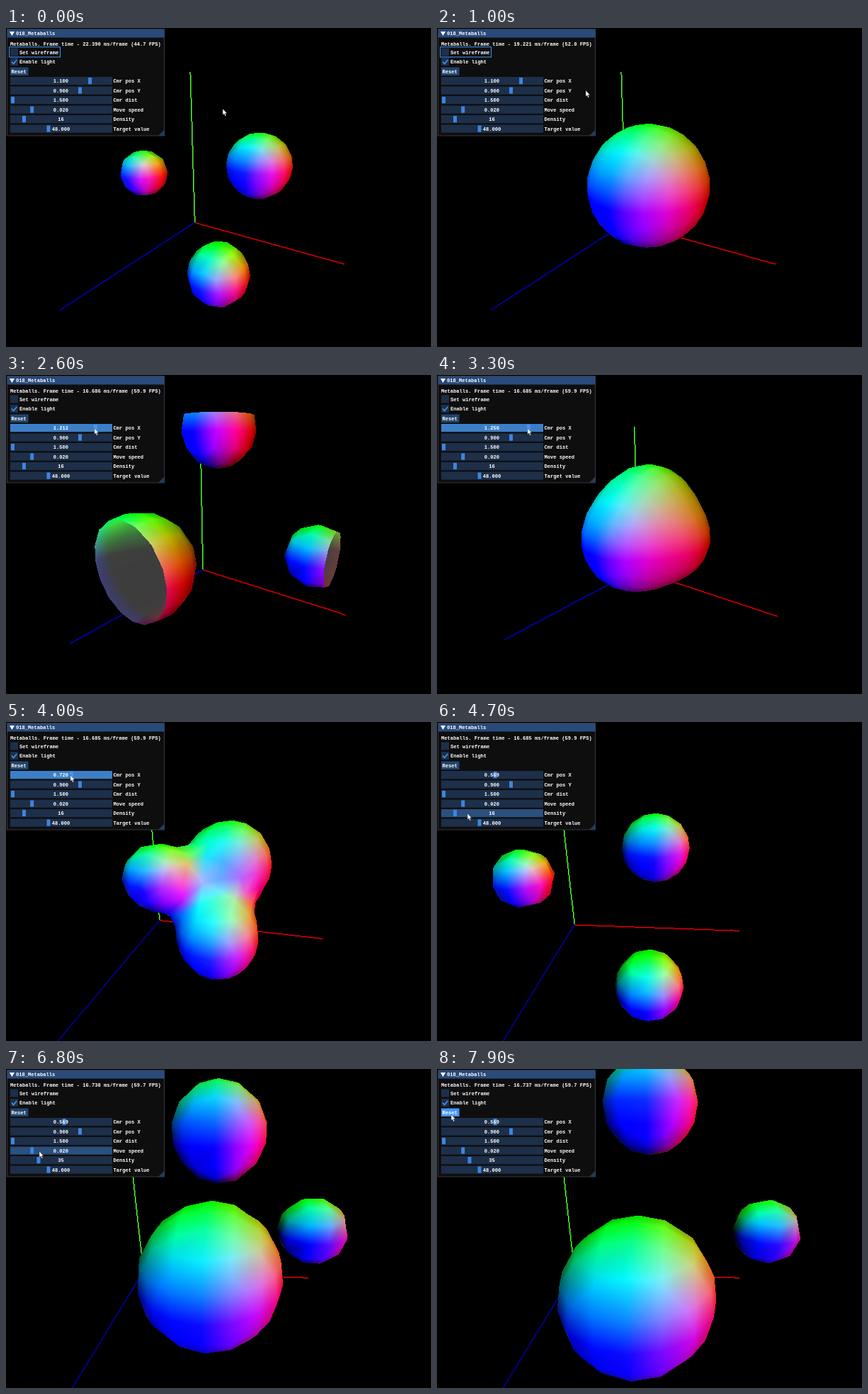
Animation, 600 px wide and 450 px high, one loop 8 s. Source, as an HTML page with a canvas:

```html
<!DOCTYPE html>
<html lang="en">
<head>
<meta charset="utf-8">
<title>Metaballs</title>
<style>
  html, body { margin: 0; width: 600px; height: 450px; overflow: hidden; background: #000; }
  canvas, svg { position: absolute; left: 0; top: 0; }
  text { font: bold 7.1px "Liberation Mono", "DejaVu Sans Mono", monospace; fill: #fff; white-space: pre; }
</style>
</head>
<body>
<canvas id="scene" width="600" height="450"></canvas>
<svg id="gui" width="600" height="450"></svg>
<script>
const W = 600, H = 450, FOCAL = 402, LOOP = 8000, CELL = 1 / 16;
const ISO = 1 / Math.sqrt(48);
const LIGHT = [0.6, 0.9, 1.6];
const ctx = document.getElementById('scene').getContext('2d');
const gui = document.getElementById('gui');
const image = ctx.createImageData(W, H);
const pixels = new Uint32Array(image.data.buffer);
const depth = new Float32Array(W * H);

// Keys are [time, value...], linear between them.
const CAM_X = [[2200, 1.1], [2500, 1.19], [2900, 1.28], [3300, 1.256], [3600, 1], [3900, 0.78], [4200, 0.6], [4350, 0.569]];
const DENSITY = [[5400, 16], [5500, 31], [6000, 29], [6400, 35]];
const FRAME_MS = [[0, 22.39], [1800, 16.686], [4700, 16.685], [6000, 16.708], [6800, 16.738], [7900, 16.737]];
const POINTER = [[0, 306, 114], [500, 300, 112], [1000, 210, 88], [1600, 117, 75], [2200, 117, 75]];
const POINTER_LATE = [[4350, 80.6, 75], [4650, 43, 129], [5400, 43, 129], [6000, 41, 129], [6400, 47, 129],
  [6550, 47, 129], [6800, 47, 116], [7100, 46, 114], [7600, 20, 64]];

function keyed(keys, t) {
  if (t <= keys[0][0]) return keys[0].slice(1);
  for (let i = 1; i < keys.length; i++) {
    const a = keys[i - 1], b = keys[i];
    if (t < b[0]) return a.slice(1).map((v, j) => v + (b[j + 1] - v) * (t - a[0]) / (b[0] - a[0]));
  }
  return keys[keys.length - 1].slice(1);
}

const dot = (a, b) => a[0] * b[0] + a[1] * b[1] + a[2] * b[2];
const sub = (a, b) => [a[0] - b[0], a[1] - b[1], a[2] - b[2]];
const unit = a => { const l = Math.hypot(...a) || 1; return a.map(v => v / l); };
const clamp = v => Math.min(1, Math.max(0, v));
const rgb = (r, g, b) => (255 << 24 | b << 16 | g << 8 | r) >>> 0;

function makeCamera(x) {
  const eye = [x, 0.9, 1.5], d = sub(eye, [0.5, 0.5, 0.5]);
  const flat = Math.hypot(d[0], d[2]), len = Math.hypot(...d);
  const ahead = d.map(v => -v / len);
  const right = [d[2] / flat, 0, -d[0] / flat];
  const up = [-d[0] * d[1] / flat / len, flat / len, -d[1] * d[2] / flat / len];
  return { eye, project(p) {
    const q = sub(p, eye), z = dot(q, ahead);
    return { x: W / 2 + FOCAL * dot(q, right) / z, y: H / 2 - FOCAL * dot(q, up) / z, w: 1 / z };
  } };
}

function triangle(a, b, c) {
  const area = (b.x - a.x) * (c.y - a.y) - (b.y - a.y) * (c.x - a.x);
  if (Math.abs(area) < 1e-6) return;
  const x0 = Math.max(0, Math.floor(Math.min(a.x, b.x, c.x))), x1 = Math.min(W - 1, Math.ceil(Math.max(a.x, b.x, c.x)));
  const y0 = Math.max(0, Math.floor(Math.min(a.y, b.y, c.y))), y1 = Math.min(H - 1, Math.ceil(Math.max(a.y, b.y, c.y)));
  for (let y = y0; y <= y1; y++) for (let x = x0; x <= x1; x++) {
    const px = x + 0.5, py = y + 0.5;
    const u = ((b.x - px) * (c.y - py) - (b.y - py) * (c.x - px)) / area;
    const v = ((c.x - px) * (a.y - py) - (c.y - py) * (a.x - px)) / area;
    const s = 1 - u - v;
    if (u < -1e-6 || v < -1e-6 || s < -1e-6) continue;
    const w = u * a.w + v * b.w + s * c.w, i = y * W + x;
    if (w <= depth[i]) continue;
    depth[i] = w;
    const mix = k => u * a.color[k] + v * b.color[k] + s * c.color[k];
    pixels[i] = rgb(mix(0), mix(1), mix(2));
  }
}

function shade(p, balls, eye) {
  const grad = [0, 0, 0];
  for (const b of balls) {
    const d = sub(p, b.pos), k = b.charge / dot(d, d) ** 2;
    for (let i = 0; i < 3; i++) grad[i] += d[i] * k;
  }
  const n = unit(grad);
  const lit = 0.65 + 0.42 * dot(n, unit(sub(LIGHT, p)));
  const inside = 0.24 * clamp(-2.5 * dot(n, unit(sub(eye, p))));
  return n.map(v => 255 * clamp(Math.max(0, 1.3 * v + 0.05) * lit + inside));
}

// The six cube faces as corner loops seen from outside; corner bits are x, y, z.
const FACES = [];
for (let axis = 0; axis < 3; axis++) {
  const a = 1 << axis, b = 1 << (axis + 1) % 3, c = 1 << (axis + 2) % 3;
  FACES.push([a, a | b, a | b | c, a | c], [c, b | c, b, 0]);
}

// Marching cubes: crossings are linked face by face, then each loop is filled as a fan.
function drawSurface(balls, density, camera) {
  const size = Math.min(density, 22) + 2;
  const at = i => (i - 1) * CELL;
  const index = (x, y, z) => (z * size + y) * size + x;
  const grid = new Float32Array(size ** 3);
  for (let z = 0; z < size; z++) for (let y = 0; y < size; y++) for (let x = 0; x < size; x++) {
    let sum = 0;
    for (const b of balls) {
      const d = sub([at(x), at(y), at(z)], b.pos);
      sum += b.charge / (dot(d, d) + 1e-9);
    }
    grid[index(x, y, z)] = 1 / Math.sqrt(sum);
  }
  const value = [];
  for (let z = 0; z < size - 1; z++) for (let y = 0; y < size - 1; y++) for (let x = 0; x < size - 1; x++) {
    let mask = 0;
    for (let c = 0; c < 8; c++) {
      value[c] = grid[index(x + (c & 1), y + (c >> 1 & 1), z + (c >> 2))];
      if (value[c] < ISO) mask |= 1 << c;
    }
    if (mask === 0 || mask === 255) continue;
    const next = new Map();
    for (const face of FACES) for (let i = 0; i < 4; i++) {
      const p = face[i], q = face[(i + 1) % 4];
      if (!(mask >> p & 1) || mask >> q & 1) continue;
      let j = i + 1;
      while (!(mask >> face[(j + 1) % 4] & 1)) j++;
      next.set(p * 8 + q, face[(j + 1) % 4] * 8 + face[j % 4]);
    }
    while (next.size) {
      const loop = [];
      let edge = next.keys().next().value;
      while (next.has(edge)) {
        const p = edge >> 3, q = edge & 7, f = (ISO - value[p]) / (value[q] - value[p]);
        const pos = [x, y, z].map((v, k) => at(v + (p >> k & 1) * (1 - f) + (q >> k & 1) * f));
        loop.push(Object.assign(camera.project(pos), { color: shade(pos, balls, camera.eye) }));
        const following = next.get(edge);
        next.delete(edge);
        edge = following;
      }
      for (let i = 2; i < loop.length; i++) triangle(loop[0], loop[i - 1], loop[i]);
    }
  }
}

function drawAxis(axis, color, camera) {
  const end = [0, 0, 0];
  end[axis] = 1;
  const a = camera.project([0, 0, 0]), b = camera.project(end);
  const plot = (x, y, w, k) => {
    const i = y * W + x;
    if (x < 0 || x >= W || y < 0 || y >= H || depth[i] > w) return;
    pixels[i] = rgb(...color.map(v => v * k));
  };
  const steps = Math.ceil(Math.max(Math.abs(b.x - a.x), Math.abs(b.y - a.y)));
  for (let i = 0; i <= steps; i++) {
    const f = i / steps, w = a.w + (b.w - a.w) * f;
    const x = Math.floor(a.x + (b.x - a.x) * f), y = Math.floor(a.y + (b.y - a.y) * f);
    plot(x + (axis === 1), y + (axis !== 1), w, 0.5);
    plot(x, y, w, 1);
  }
}

function drawScene(t, camX, density) {
  const s = 0.5 * Math.sin(1.2 * (t / 1000 - 6.147));
  const balls = [0.58, 1, 1.5].map((charge, axis) => {
    const pos = [0.5, 0.5, 0.5];
    pos[axis] += s;
    return { pos, charge };
  });
  const camera = makeCamera(camX);
  pixels.fill(0xff000000);
  depth.fill(0);
  drawSurface(balls, density, camera);
  [[225, 0, 0], [80, 255, 40], [0, 0, 215]].forEach((color, axis) => drawAxis(axis, color, camera));
  ctx.putImageData(image, 0, 0);
}

const rect = (x, y, w, h, fill, more = '') => `<rect x="${x}" y="${y}" width="${w}" height="${h}" fill="${fill}" ${more}/>`;
const label = (x, y, s, more = '') => `<text x="${x}" y="${y}" ${more}>${s}</text>`;

function drawGui(t, camX, density) {
  const [ms] = keyed(FRAME_MS, t);
  const handleX = 43 + 68.7 * camX;
  const [mx, my] = t < 2200 ? keyed(POINTER, t) : t < 4350 ? [handleX - 1.5, 75] : keyed(POINTER_LATE, t);
  const over = (x, y, w, h) => mx >= x && mx <= x + w && my >= y && my <= y + h;
  const sliders = [
    ['Cmr pos X', camX.toFixed(3), handleX, t >= 2200 && t < 4400],
    ['Cmr pos Y', '0.900', 104.5],
    ['Cmr dist', '1.500', 9.5],
    ['Move speed', '0.020', 36.7],
    ['Density', density, 8.27 + 1.077 * density, t >= 5400 && t < 6500],
    ['Target value', '48.000', 60]
  ];
  let out = rect(1.5, 1.5, 222, 150.5, '#0e0e0f', 'stroke="#37373f"')
    + rect(2, 2, 221.5, 11.5, '#294a7a')
    + '<path d="M5 5h7l-3.5 6z" fill="#fff"/>'
    + label(14, 10.3, '018_Metaballs')
    + label(6, 24.5, `Metaballs. Frame time - ${ms.toFixed(3)} ms/frame (${(1000 / ms).toFixed(1)} FPS)`)
    + rect(6, 28.5, 11, 11, '#1d2f49') + label(19, 36.5, 'Set wireframe')
    + rect(6, 42, 11, 11, '#1d2f49') + label(19, 50, 'Enable light')
    + '<path d="M8 47.5l2.6 3 4.6-5.6" fill="none" stroke="#4296fa" stroke-width="1.6"/>'
    + rect(6, 55.5, 25.5, 11.5, over(6, 55.5, 25.5, 11.5) ? '#4296fa' : '#23456d')
    + label(7.5, 63.5, 'Reset');
  if (t < 2200) out += rect(4.5, 26.8, 72, 14.2, 'none', 'stroke="#4296fa"');
  sliders.forEach(([name, value, x, active], i) => {
    const y = 69 + 13.5 * i;
    const hover = over(6, y, 144, 11.2) && (t < 2200 || t >= 4400);
    out += rect(6, y, 144, 11.2, active ? '#3d7fc6' : hover ? '#2a507e' : '#1d2f49')
      + rect(x - 2.5, y + 1, 5, 9.2, active ? '#4296fa' : '#3d85e0')
      + label(77.5, y + 8, value, 'text-anchor="middle"')
      + label(151.5, y + 8, name);
  });
  out += '<path d="M223 144v8h-8z" fill="#1f3c60"/>'
    + `<path transform="translate(${mx} ${my})" d="M0 0v8.6l1.9-1.6 1.5 3.2 1.5-.7-1.5-3.1h2.6z" fill="#fff" stroke="#222" stroke-width=".5"/>`;
  gui.innerHTML = out;
}

let shown = -1;
function tick() {
  const t = Math.floor(performance.now() % LOOP / 100) * 100;
  if (t !== shown) {
    shown = t;
    const [camX] = keyed(CAM_X, t);
    const density = Math.round(keyed(DENSITY, t)[0]);
    drawScene(t, camX, density);
    drawGui(t, camX, density);
  }
  requestAnimationFrame(tick);
}
tick();
</script>
</body>
</html>
```
